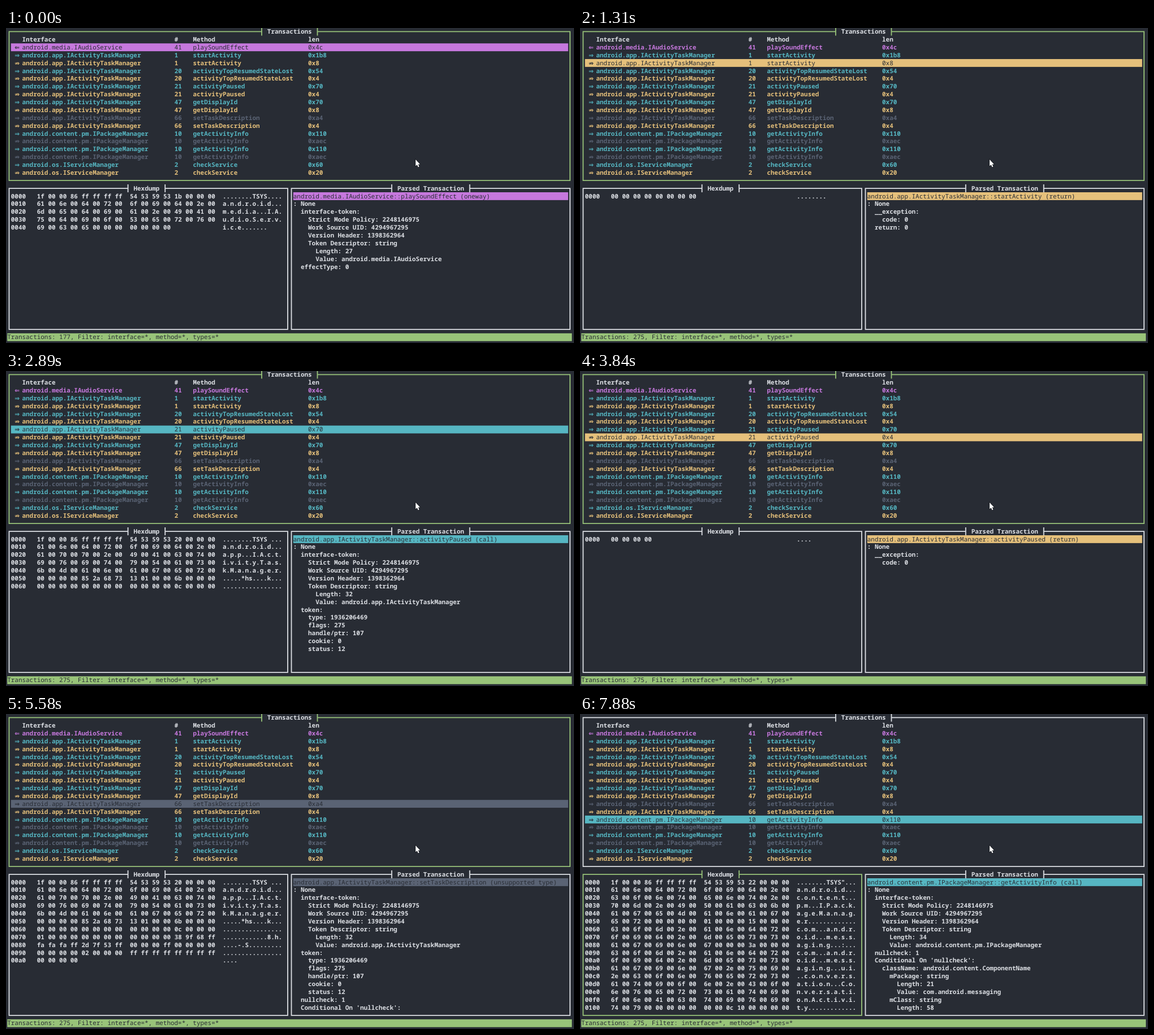
Animation of 1004x558 px, one loop 8 s. Source, as an HTML page with a canvas:

```html
<!DOCTYPE html>
<html lang="en">
<head>
<meta charset="utf-8">
<title>Transactions</title>
<style>
  html, body { margin: 0; width: 100%; height: 100%; overflow: hidden; background: #282c34; }
  canvas { display: block; }
</style>
</head>
<body>
<canvas id="stage" width="1004" height="558"></canvas>
<script>
const ctx = document.getElementById('stage').getContext('2d');
const LOOP = 8000, FOCUS_AT = 7880;
const CELL_W = 6.566, CELL_H = 13.88, LEFT = 2.2, TOP = -0.5;
const FONT = '10.943px "Noto Sans Mono", "DejaVu Sans Mono", monospace';
const ARROW_FONT = 'bold 10.5px "DejaVu Sans", sans-serif';
const BG = '#282c34', WHITE = '#dcdfe4', GREEN = '#98c379';
const COLORS = { oneway: '#c678dd', call: '#56b6c2', return: '#e5c07b', unsupported: '#5a6374' };

const AUDIO = 'android.media.IAudioService';
const TASKS = 'android.app.IActivityTaskManager';
const PACKAGES = 'android.content.pm.IPackageManager';
const SERVICES = 'android.os.IServiceManager';
const APP = 'com.android.messaging';

const rows = [
  ['oneway', '⇐', AUDIO, 41, 'playSoundEffect', '0x4c'],
  ['call', '⇒', TASKS, 1, 'startActivity', '0x1b8'],
  ['return', '⇏', TASKS, 1, 'startActivity', '0x8'],
  ['call', '⇒', TASKS, 20, 'activityTopResumedStateLost', '0x54'],
  ['return', '⇏', TASKS, 20, 'activityTopResumedStateLost', '0x4'],
  ['call', '⇒', TASKS, 21, 'activityPaused', '0x70'],
  ['return', '⇏', TASKS, 21, 'activityPaused', '0x4'],
  ['call', '⇒', TASKS, 47, 'getDisplayId', '0x70'],
  ['return', '⇏', TASKS, 47, 'getDisplayId', '0x8'],
  ['unsupported', '⇒', TASKS, 66, 'setTaskDescription', '0xa4'],
  ['return', '⇏', TASKS, 66, 'setTaskDescription', '0x4'],
  ['call', '⇒', PACKAGES, 10, 'getActivityInfo', '0x110'],
  ['unsupported', '⇏', PACKAGES, 10, 'getActivityInfo', '0xaec'],
  ['call', '⇒', PACKAGES, 10, 'getActivityInfo', '0x110'],
  ['unsupported', '⇏', PACKAGES, 10, 'getActivityInfo', '0xaec'],
  ['call', '⇒', SERVICES, 2, 'checkService', '0x60'],
  ['return', '⇏', SERVICES, 2, 'checkService', '0x20'],
];

// Parcel encoding
const bytes = hex => hex.match(/../g).map(h => parseInt(h, 16));
const int = n => [0, 8, 16, 24].map(shift => n >>> shift & 255);
const string16 = s => {
  const out = [...int(s.length), ...[...s].flatMap(c => [c.charCodeAt(0), 0]), 0, 0];
  while (out.length % 4) out.push(0);
  return out;
};
const header = name => [...bytes('1f000086ffffffff54535953'), ...string16(name)];
const binder = (type, handle, cookie) => [type, 275, handle, 0, cookie, 0, 12].flatMap(int);

// Parsed trees
const token = name => [': None', '  interface-token:', '    Strict Mode Policy: 2248146975',
  '    Work Source UID: 4294967295', '    Version Header: 1398362964',
  '    Token Descriptor: string', '      Length: ' + name.length, '      Value: ' + name];
const binderTree = (label, type, handle, cookie) => [`  ${label}:`, `    type: ${type}`,
  '    flags: 275', `    handle/ptr: ${handle}`, `    cookie: ${cookie}`, '    status: 12'];
const reply = [': None', '  __exception:', '    code: 0'];

const caller = [1935813253, 4004365072, 4003523024];
const activity = [1936206469, 107, 0];
const className = APP + '.ui.conversation.ConversationActivity';

const empty = { data: int(0), tree: reply };
const zeroResult = { data: [...int(0), ...int(0)], tree: [...reply, '  return: 0'] };
const withToken = {
  data: [...header(TASKS), ...binder(...activity)],
  tree: [...token(TASKS), ...binderTree('token', ...activity)],
};
const details = [
  { data: [...header(AUDIO), ...int(0)], tree: [...token(AUDIO), '  effectType: 0'] },
  {
    data: [...header(TASKS), ...binder(...caller), ...string16(APP),
      ...bytes('ffffffff01000000ffffffff00000000ffffffffffffffff00000004ffffffff'),
      ...string16(APP), ...string16(className)],
    tree: [...token(TASKS), ...binderTree('caller', ...caller), '  callingPackage:', '    Length: 21'],
  },
  zeroResult,
  { data: header(TASKS), tree: token(TASKS) },
  empty, withToken, empty, withToken, zeroResult,
  {
    data: [...withToken.data, ...int(1), ...int(0), ...int(0),
      ...bytes('389f68fffafafaff2d7f53ff000000ff'), ...int(0), ...int(0), ...int(2),
      ...bytes('ffffffffffffffff'), ...int(0)],
    tree: [...withToken.tree, '  nullcheck: 1', "  Conditional On 'nullcheck':"],
  },
  empty,
  {
    data: [...header(PACKAGES), ...int(1), ...string16(APP), ...string16(className),
      ...bytes('00000c1000000000')],
    tree: [...token(PACKAGES), '  nullcheck: 1', "  Conditional On 'nullcheck':",
      '    className: android.content.ComponentName', '      mPackage: string', '        Length: 21',
      '        Value: ' + APP, '      mClass: string', '        Length: 58'],
  },
];

const selectTimes = [520, 1190, 1870, 2390, 2890, 3840, 4400, 4900, 5580, 6170, 6730];
const counts = [[0, 177], [120, 187], [370, 207], [520, 217], [640, 227],
  [790, 237], [940, 247], [1190, 267], [1310, 275]];

const colX = col => LEFT + col * CELL_W;
const rowY = row => TOP + row * CELL_H;

function text(col, row, str, color = WHITE, weight = 'bold') {
  ctx.font = `${weight} ${FONT}`;
  ctx.fillStyle = color;
  ctx.fillText(str, colX(col), rowY(row) + 10.6);
}

function bar(col, row, endCol, color) {
  ctx.fillStyle = color;
  ctx.fillRect(colX(col), rowY(row), (endCol - col) * CELL_W, CELL_H);
}

function frame(col, row, endCol, endRow, title, titleCol, color) {
  const [x1, x2, tick1, tick2] =
    [col, endCol, titleCol - 2, titleCol + title.length + 1].map(c => colX(c + 0.5));
  const y1 = rowY(row + 0.5), y2 = rowY(endRow + 0.5);
  ctx.strokeStyle = color;
  ctx.lineWidth = 1.8;
  ctx.beginPath();
  ctx.moveTo(tick1, y1);
  ctx.lineTo(x1, y1);
  ctx.lineTo(x1, y2);
  ctx.lineTo(x2, y2);
  ctx.lineTo(x2, y1);
  ctx.lineTo(tick2, y1);
  for (const x of [tick1, tick2]) {
    ctx.moveTo(x, rowY(row));
    ctx.lineTo(x, rowY(row + 1));
  }
  ctx.stroke();
  text(titleCol, row, title);
}

function drawList(selected) {
  [[4, 'Interface'], [45, '#'], [50, 'Method'], [81, 'len']].forEach(([col, s]) => text(col, 1, s));
  rows.forEach(([kind, arrow, name, code, method, len], i) => {
    const row = i + 2, active = i === selected;
    const color = active ? BG : COLORS[kind];
    if (active) bar(1, row, 151, COLORS[kind]);
    ctx.font = ARROW_FONT;
    ctx.fillStyle = color;
    ctx.fillText(arrow, colX(2), rowY(row) + 10.6);
    [[4, name], [45, code], [50, method], [81, len]].forEach(([col, s]) =>
      text(col, row, String(s), color, active ? 'normal' : 'bold'));
  });
}

function drawHex(data) {
  for (let line = 0; line < 17 && line * 16 < data.length; line++) {
    const chunk = data.slice(line * 16, line * 16 + 16);
    const hex = chunk.map(b => b.toString(16).padStart(2, '0'));
    const row = 21 + line;
    text(1, row, (line * 16).toString(16).padStart(4, '0'));
    text(8, row, hex.slice(0, 8).join(' '));
    text(33, row, hex.slice(8).join(' '));
    text(58, row, chunk.map(b => b > 31 && b < 127 ? String.fromCharCode(b) : '.').join(''));
  }
}

function drawTree(selected) {
  const [kind, , name, , method] = rows[selected];
  const label = kind === 'unsupported' ? 'unsupported type' : kind;
  bar(77, 21, 151, COLORS[kind]);
  text(77, 21, `${name}::${method} (${label})`, BG, 'normal');
  details[selected].tree.forEach((line, i) => {
    const indent = line.search(/\S/);
    text(77 + indent, 22 + i, line.slice(indent));
  });
}

function drawPointer() {
  const path = new Path2D('M724 233V244.6L726.6 242.2L728.5 246.4L730.4 245.6L728.6 241.5H732Z');
  ctx.strokeStyle = '#15181d';
  ctx.lineWidth = 1.4;
  ctx.stroke(path);
  ctx.fillStyle = '#fff';
  ctx.fill(path);
}

function draw(now) {
  const t = now % LOOP;
  const selected = selectTimes.filter(at => at <= t).length;
  const count = counts.filter(([at]) => at <= t).pop()[1];
  const hexFocused = t >= FOCUS_AT;

  ctx.textRendering = 'geometricPrecision';
  ctx.fillStyle = BG;
  ctx.fillRect(0, 0, 1004, 558);
  frame(0, 0, 151, 19, 'Transactions', 70, hexFocused ? WHITE : GREEN);
  frame(0, 20, 75, 38, 'Hexdump', 34, hexFocused ? GREEN : WHITE);
  frame(76, 20, 151, 38, 'Parsed Transaction', 105, WHITE);
  drawList(selected);
  drawHex(details[selected].data);
  drawTree(selected);
  bar(0, 39, 152, GREEN);
  text(0, 39, `Transactions: ${count}, Filter: interface=*, method=*, types=*`, BG, 'normal');
  drawPointer();
}

function tick() {
  draw(performance.now());
  requestAnimationFrame(tick);
}
tick();
</script>
</body>
</html>
```
